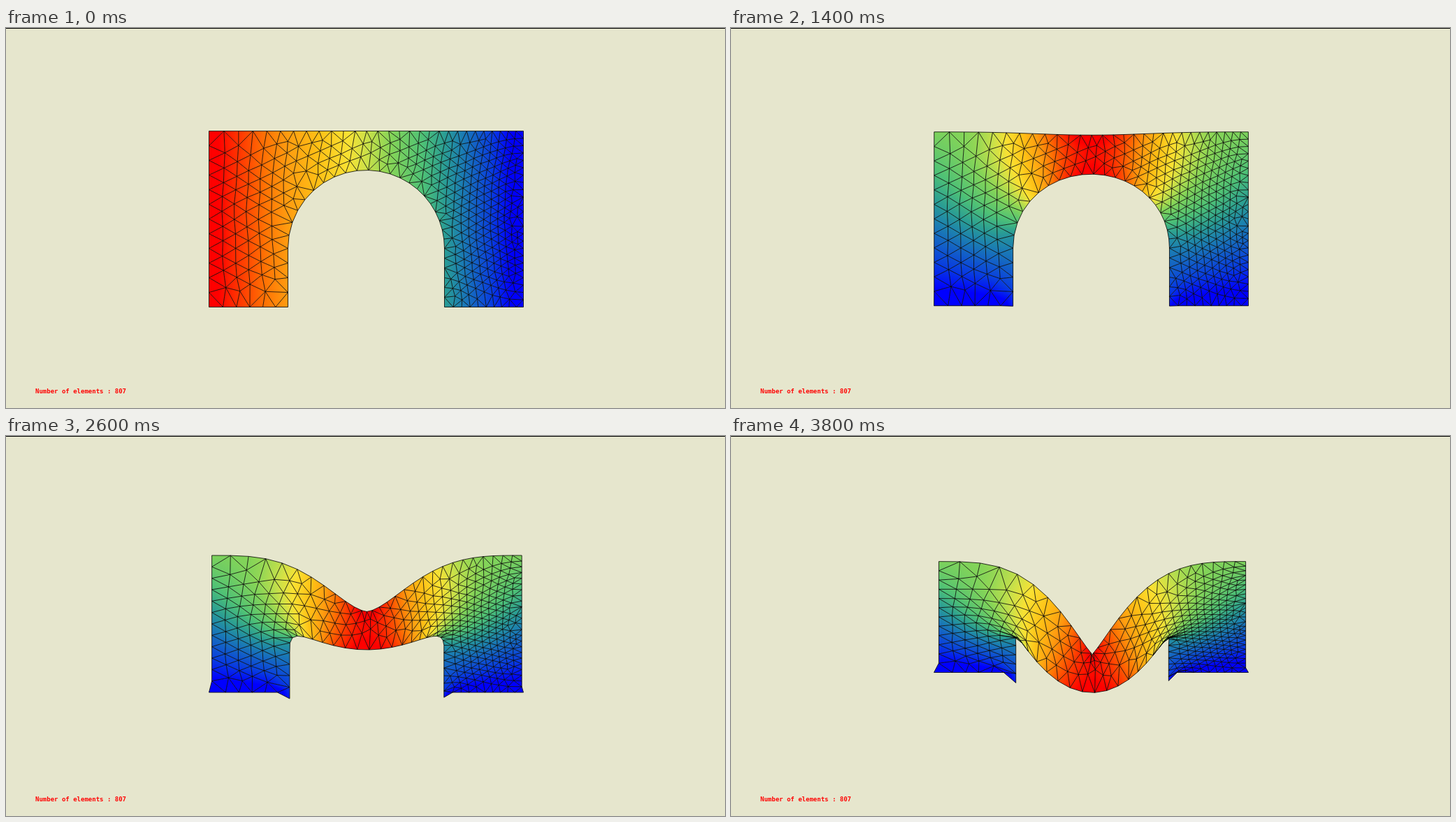
Animation of 1029 by 544 pixels, one loop 4 s. Source, as an HTML page with a canvas:

```html
<!DOCTYPE html>
<html lang="en">
<head>
<meta charset="utf-8">
<title>Arch under load</title>
<style>
html, body { margin: 0; width: 100%; height: 100%; overflow: hidden; background: #e6e6cd; }
canvas { position: absolute; left: 0; top: 0; display: block; }
#label {
  position: absolute; left: 42px; top: 515px; white-space: pre;
  font: bold 9px/10px "DejaVu Sans Mono", monospace; color: #f00;
}
</style>
</head>
<body>
<canvas id="stage" width="1029" height="544"></canvas>
<div id="label">Number of elements : 807</div>
<script>
const ctx = document.getElementById("stage").getContext("2d");

// Geometry of the arch block
const LEFT = 290, RIGHT = 740, TOP = 147, BASE = 399;
const MID = 515, RADIUS = 112, SPRING = 315, HALF = 225;
const INNER_L = MID - RADIUS, INNER_R = MID + RADIUS;

// Element size shrinks linearly towards a far apex on the right
const APEX = 1170, GRADE = 0.0244;
const sizeAt = x => (APEX - x) * GRADE;

let seed = 11;
const random = () => (seed = (seed * 16807) % 2147483647) / 2147483647;
const near = (a, b) => Math.abs(a - b) < 0.01;
const line = (x0, y0, x1, y1) => t => [x0 + (x1 - x0) * t, y0 + (y1 - y0) * t];
const archCurve = t => [MID + RADIUS * Math.cos(Math.PI * t), SPRING - RADIUS * Math.sin(Math.PI * t)];

// Split a curve into pieces that follow the local element size
function split(curve) {
  const steps = 600, sums = [0];
  for (let i = 1; i <= steps; i++) {
    const a = curve((i - 1) / steps), b = curve(i / steps);
    sums.push(sums[i - 1] + Math.hypot(b[0] - a[0], b[1] - a[1]) / sizeAt(a[0]));
  }
  const count = Math.round(sums[steps]), out = [];
  for (let k = 0, i = 0; k < count; k++) {
    const goal = sums[steps] * k / count;
    while (i < steps - 1 && sums[i + 1] <= goal) i++;
    out.push(curve((i + (goal - sums[i]) / (sums[i + 1] - sums[i])) / steps));
  }
  return out;
}

const outline = [
  line(LEFT, BASE, LEFT, TOP), line(LEFT, TOP, RIGHT, TOP),
  line(RIGHT, TOP, RIGHT, BASE), line(RIGHT, BASE, INNER_R, BASE),
  line(INNER_R, BASE, INNER_R, SPRING), archCurve,
  line(INNER_L, SPRING, INNER_L, BASE), line(INNER_L, BASE, LEFT, BASE)
].flatMap(split);

function inside(x, y) {
  let hit = false;
  outline.forEach(([ax, ay], i) => {
    const [bx, by] = outline[(i + 1) % outline.length];
    if ((ay > y) !== (by > y) && x < ax + (bx - ax) * (y - ay) / (by - ay)) hit = !hit;
  });
  return hit;
}

// Hexagonal lattice in log-polar coordinates, slightly disturbed
function fillPoints() {
  const out = [];
  for (let j = 0; j < 60; j++) {
    const r = (APEX - LEFT) * Math.exp(-0.866 * GRADE * j);
    for (let k = -16; k <= 16; k++) {
      const a = (k + (j % 2) / 2) * GRADE, h = r * GRADE;
      const x = APEX - r * Math.cos(a) + (random() - 0.5) * 0.4 * h;
      const y = 273 + r * Math.sin(a) + (random() - 0.5) * 0.4 * h;
      if (inside(x, y) && outline.every(p => Math.hypot(p[0] - x, p[1] - y) > 0.79 * h)) out.push([x, y]);
    }
  }
  return out;
}

function circle(pts, tri) {
  const [[ax, ay], [bx, by], [cx, cy]] = tri.map(i => pts[i]);
  const px = bx - ax, py = by - ay, qx = cx - ax, qy = cy - ay;
  const d = 2 * (px * qy - py * qx), p = px * px + py * py, q = qx * qx + qy * qy;
  const ux = (qy * p - py * q) / d, uy = (px * q - qx * p) / d;
  return { tri, x: ax + ux, y: ay + uy, r2: ux * ux + uy * uy };
}

// Incremental Delaunay triangulation, kept inside the outline
function triangulate(nodes) {
  const n = nodes.length;
  const pts = [...nodes, [-40000, -30000], [41000, -31000], [600, 50000]];
  let cells = [circle(pts, [n, n + 1, n + 2])];
  for (let i = 0; i < n; i++) {
    const [x, y] = pts[i], edges = new Map(), keep = [];
    for (const c of cells) {
      if ((x - c.x) ** 2 + (y - c.y) ** 2 >= c.r2) { keep.push(c); continue; }
      c.tri.forEach((a, k) => {
        const b = c.tri[(k + 1) % 3], back = b + "," + a;
        if (!edges.delete(back)) edges.set(a + "," + b, [a, b]);
      });
    }
    for (const [a, b] of edges.values()) {
      const c = circle(pts, [a, b, i]);
      if (Number.isFinite(c.r2)) keep.push(c);
    }
    cells = keep;
  }
  return cells.map(c => c.tri).filter(t => {
    if (t.some(i => i >= n)) return false;
    const [a, b, c] = t.map(i => pts[i]);
    const area = (b[0] - a[0]) * (c[1] - a[1]) - (b[1] - a[1]) * (c[0] - a[0]);
    return Math.abs(area) > 1 && inside((a[0] + b[0] + c[0]) / 3, (a[1] + b[1] + c[1]) / 3);
  });
}

const rim = outline.length;
const nodes = [...outline, ...fillPoints()];
let tris = triangulate(nodes);
for (let pass = 0; pass < 2; pass++) {
  const sums = nodes.map(() => [0, 0, 0]);
  for (const t of tris) for (const a of t) for (const b of t) if (a !== b) {
    sums[a][0] += nodes[b][0]; sums[a][1] += nodes[b][1]; sums[a][2]++;
  }
  for (let i = rim; i < nodes.length; i++) {
    const [sx, sy, c] = sums[i];
    if (c) nodes[i] = [(nodes[i][0] + sx / c) / 2, (nodes[i][1] + sy / c) / 2];
  }
  tris = triangulate(nodes);
}

// Edges and cotangent weights
const edgeMap = new Map(), links = nodes.map(() => []);
for (const t of tris) for (let k = 0; k < 3; k++) {
  const a = t[k], b = t[(k + 1) % 3], [ox, oy] = nodes[t[(k + 2) % 3]];
  const px = nodes[a][0] - ox, py = nodes[a][1] - oy, qx = nodes[b][0] - ox, qy = nodes[b][1] - oy;
  const w = Math.max(0.02, (px * qx + py * qy) / Math.abs(px * qy - py * qx));
  links[a].push([b, w]);
  links[b].push([a, w]);
  edgeMap.set(Math.min(a, b) + "," + Math.max(a, b), [a, b]);
}
const edges = [...edgeMap.values()];

const onArch = ([x, y]) => y < SPRING - 0.01 && Math.abs(x - MID) < RADIUS && !near(y, TOP);

// Sag prescribed along the rim
const rimSag = ({ wall, bulge, spring, foot, power }) => p => {
  const [x, y] = p;
  if (near(y, BASE)) return near(x, INNER_L) ? foot : near(x, INNER_R) ? foot * 0.8 : 0;
  if (near(y, TOP)) return wall + (1 - wall) * Math.abs(Math.cos(Math.PI / 2 * (x - MID) / HALF)) ** power;
  if (near(x, LEFT) || near(x, RIGHT)) return wall * (1 - ((y - TOP) / (BASE - TOP)) ** bulge);
  if (onArch(p)) return spring + (0.99 - spring) * ((SPRING - y) / RADIUS) ** 1.75;
  return foot + (spring - foot) * (BASE - y) / (BASE - SPRING);
};

// Sideways drift along the rim: the top closes in, the arch opens
function rimDrift(p) {
  const [x, y] = p, off = x - MID, linear = 0.1 - 0.0016 * off;
  if (near(y, BASE) && (near(x, LEFT) || near(x, RIGHT))) return 0;
  if (near(y, TOP)) {
    return linear - Math.sign(off) * 2.55 * Math.sin(Math.PI * Math.abs(off / HALF) ** 0.8);
  }
  if (onArch(p)) return linear + 0.8 * off * (SPRING - y) / RADIUS ** 2;
  return linear;
}

// Harmonic extension of the rim values
function solve(rimValue) {
  const v = nodes.map((p, i) => i < rim ? rimValue(p) : 0.4);
  for (let pass = 0; pass < 300; pass++) {
    for (let i = rim; i < nodes.length; i++) {
      let s = 0, w = 0;
      for (const [j, c] of links[i]) { s += c * v[j]; w += c; }
      if (w) v[i] = s / w;
    }
  }
  return v;
}

const height = nodes.map(p => (BASE - p[1]) / (BASE - TOP));
const across = nodes.map(p => (RIGHT - p[0]) / (RIGHT - LEFT));
const bulged = height.map(h => 1 - (1 - h) ** 2);
const loaded = solve(rimSag({ wall: 0.52, bulge: 2, spring: 0.34, foot: 0.09, power: 4 }));
const sag = solve(rimSag({ wall: 0.41, bulge: 1, spring: 0.2, foot: 0.066, power: 3.3 }));
const drift = solve(rimDrift);
const fields = [across, height, bulged, loaded];
const smallLoads = [0, 0.1, 0.2, 0.5, 1];

const ramp = [
  [0, 0, 0, 255], [0.04, 0, 0, 255], [0.1, 8, 60, 225], [0.2, 28, 128, 176],
  [0.25, 42, 157, 148], [0.32, 78, 193, 118], [0.42, 132, 212, 88], [0.5, 205, 225, 72],
  [0.56, 250, 225, 50], [0.65, 255, 193, 22], [0.75, 255, 156, 16], [0.82, 255, 115, 4],
  [0.93, 255, 35, 0], [0.97, 255, 0, 0], [1, 255, 0, 0]
].map(([at, ...rgb]) => ({ at, rgb, css: `rgb(${rgb})` }));

function colour(v) {
  const i = Math.max(1, ramp.findIndex(s => s.at >= Math.min(1, v)));
  const a = ramp[i - 1], b = ramp[i];
  const t = Math.max(0, Math.min(1, (v - a.at) / (b.at - a.at)));
  return `rgb(${a.rgb.map((c, k) => Math.round(c + (b.rgb[k] - c) * t))})`;
}

// Displaced nodes, centred vertically by their bounding box
function deform(load) {
  const pts = nodes.map(([x, y], i) => [x + load * drift[i], y + load * 15.15 * sag[i]]);
  const ys = pts.map(p => p[1]);
  const shift = (TOP + BASE - Math.min(...ys) - Math.max(...ys)) / 2;
  return pts.map(([x, y]) => [x + 0.5, y + shift + 0.5]);
}

// Fill a triangle with the colour ramp along its value gradient
function shade([a, b, c], [va, vb, vc]) {
  const px = b[0] - a[0], py = b[1] - a[1], qx = c[0] - a[0], qy = c[1] - a[1];
  const det = px * qy - py * qx, dp = vb - va, dq = vc - va;
  const gx = (dp * qy - dq * py) / det, gy = (dq * px - dp * qx) / det, g2 = gx * gx + gy * gy;
  if (!(g2 > 1e-8) || !Number.isFinite(g2)) {
    ctx.fillStyle = colour((va + vb + vc) / 3);
  } else {
    const at = v => [a[0] + gx * (v - va) / g2, a[1] + gy * (v - va) / g2];
    const fill = ctx.createLinearGradient(...at(0), ...at(1));
    for (const s of ramp) fill.addColorStop(s.at, s.css);
    ctx.fillStyle = fill;
  }
  ctx.beginPath();
  for (const p of [a, b, c]) ctx.lineTo(...p);
  ctx.fill();
}

function draw(step) {
  const load = step < 4 ? 0 : step < 9 ? smallLoads[step - 4] : step - 4;
  const values = fields[step] || sag, pts = deform(load);
  ctx.fillStyle = "#e6e6cd";
  ctx.fillRect(0, 0, 1029, 544);
  ctx.fillStyle = "#000";
  ctx.fillRect(0, 0, 1029, 1);
  for (const t of tris) shade(t.map(i => pts[i]), t.map(i => values[i]));
  ctx.strokeStyle = "#000";
  ctx.lineWidth = 0.8;
  ctx.beginPath();
  for (const [a, b] of edges) {
    ctx.moveTo(...pts[a]);
    ctx.lineTo(...pts[b]);
  }
  ctx.stroke();
}

const STEP = 200, STEPS = 20;
let shown = -1;
function tick() {
  const step = Math.floor(performance.now() / STEP) % STEPS;
  if (step !== shown) draw(shown = step);
  requestAnimationFrame(tick);
}
tick();
</script>
</body>
</html>
```
